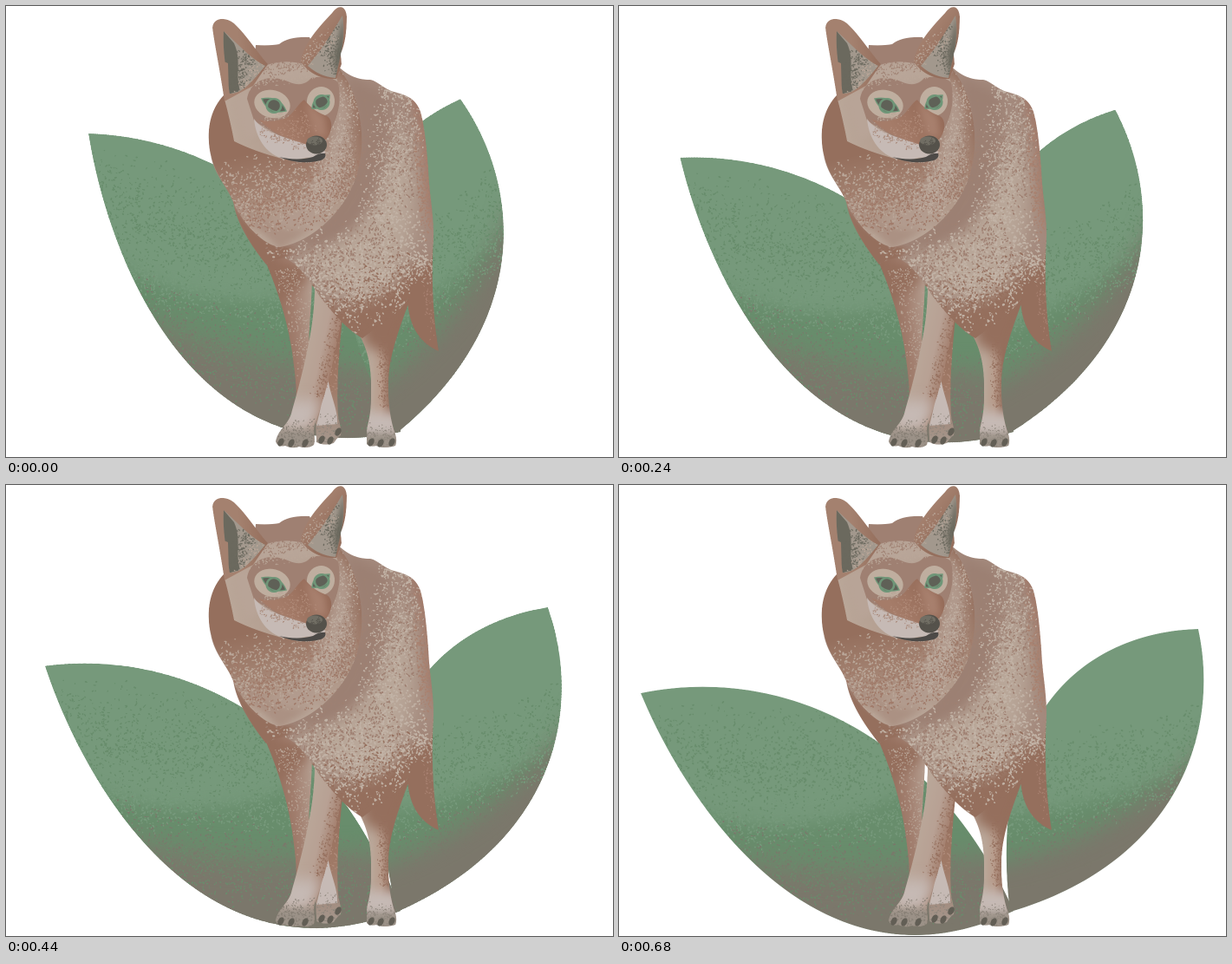
An HTML page with a canvas for the animation above (1.92 s loop, 700 by 520 pixels).

```html
<!DOCTYPE html>
<html lang="en">
<head>
<meta charset="utf-8">
<title>Coyote between leaves</title>
<style>
html, body { margin: 0; width: 100%; height: 100%; overflow: hidden; background: #fff; }
canvas { display: block; width: 700px; height: 520px; }
</style>
</head>
<body>
<canvas id="stage" width="700" height="520"></canvas>
<script>
const W = 700, H = 520, SCALE = 2;
const LOOP = 1920, STEP = 40, STEPS = 17;

const RUST = '#956f5d', BROWN = '#9f8072', TAN = '#baa799', PALE = '#c6bab5';
const GREY = '#6b695e', DARK = '#55524b', EYE = '#6f9678';
const LEAF = '#76997b', SHADE = '#688d6c', EARTH = '#7b776b';

let seed = 7;
function rnd() {
  seed = (seed * 1664525 + 1013904223) % 4294967296;
  return seed / 4294967296;
}

function layer(paint) {
  const c = document.createElement('canvas');
  c.width = W * SCALE;
  c.height = H * SCALE;
  const g = c.getContext('2d');
  g.scale(SCALE, SCALE);
  paint(g);
  return c;
}

function fill(g, d, color) {
  g.fillStyle = color;
  g.fill(new Path2D(d));
}

function line(g, d, color, width) {
  g.strokeStyle = color;
  g.lineWidth = width;
  g.lineCap = 'round';
  g.stroke(new Path2D(d));
}

function ramp(g, x0, y0, x1, y1, ...colors) {
  const r = g.createLinearGradient(x0, y0, x1, y1);
  colors.forEach((c, i) => r.addColorStop(i / (colors.length - 1), c));
  return r;
}

function within(g, d, paint) {
  g.save();
  g.clip(new Path2D(d));
  paint();
  g.restore();
}

function soft(g, d, color, blur) {
  g.save();
  g.filter = `blur(${blur * SCALE}px)`;
  fill(g, d, color);
  g.restore();
}

// Specks in a band that is densest halfway along its axis
function grain(g, color, x0, y0, x1, y1, width, count, size = 1) {
  const dx = x1 - x0, dy = y1 - y0, len = Math.hypot(dx, dy);
  g.fillStyle = color;
  for (let i = 0; i < count; i++) {
    const s = (rnd() + rnd()) / 2, u = (rnd() - 0.5) * width / len;
    g.beginPath();
    g.ellipse(x0 + dx * s - dy * u, y0 + dy * s + dx * u,
      size * (0.6 + rnd() * 1.2), size * (0.5 + rnd() * 0.5), rnd() * 3.14, 0, 6.283);
    g.fill();
  }
}

function ellipse(g, x, y, rx, ry, color, turn = 0) {
  g.fillStyle = color;
  g.beginPath();
  g.ellipse(x, y, rx, ry, turn, 0, 6.283);
  g.fill();
}

function paintLeft(g) {
  const d = 'M25 240C190 206 365 290 455 491C240 595 85 385 25 240Z';
  within(g, d, () => {
    fill(g, d, LEAF);
    soft(g, 'M40 355Q210 440 370 328L490 500L200 570Z', SHADE, 8);
    soft(g, 'M90 425Q250 462 370 435L500 420L500 570L100 570Z', EARTH, 15);
    grain(g, SHADE, 200, 250, 195, 400, 420, 2100);
    grain(g, LEAF, 200, 345, 205, 422, 320, 1300);
    grain(g, EARTH, 235, 390, 225, 505, 380, 1700, 0.8);
    grain(g, SHADE, 260, 425, 255, 505, 330, 900, 0.8);
  });
}

function paintRight(g) {
  const d = 'M668 166C570 168 420 230 451 492C639 437 695 290 668 166Z';
  within(g, d, () => {
    fill(g, d, LEAF);
    soft(g, 'M430 380Q570 372 700 305V530H430Z', SHADE, 8);
    soft(g, 'M420 440Q570 420 700 280V550H420Z', EARTH, 13);
    grain(g, SHADE, 550, 275, 575, 375, 270, 900);
    grain(g, LEAF, 563, 320, 580, 388, 270, 900);
    grain(g, EARTH, 565, 355, 595, 430, 260, 900, 0.7);
  });
}

function paintLegs(g) {
  const tail = 'M493 270C490 315 493 360 499 398C480 390 464 372 463 338C466 312 478 295 484 275Z';
  within(g, tail, () => {
    fill(g, tail, RUST);
    grain(g, TAN, 484, 255, 478, 325, 40, 260);
    grain(g, '#a98272', 490, 300, 494, 390, 20, 90, 0.8);
  });

  const far = 'M388 360C384 400 381 440 383 470C384 482 388 488 386 495Q381 499 378 504Q368 508 358 503L357 480C362 450 368 425 366 390Z';
  within(g, far, () => {
    fill(g, far, ramp(g, 0, 370, 0, 505, RUST, '#a07a67', '#a5988e'));
    fill(g, 'M371 428C374 450 383 465 382 482L358 484Z', PALE);
    grain(g, '#b49180', 385, 380, 372, 450, 60, 180, 0.7);
    grain(g, '#8d857b', 370, 468, 370, 512, 34, 120, 0.7);
  });

  const near = 'M298 292C314 328 325 366 330 400C334 430 337 452 332 464L354 435C345 400 352 360 353 318L335 285Z';
  within(g, near, () => {
    fill(g, near, ramp(g, 310, 345, 352, 340, RUST, '#a27f6f', '#b39b8d'));
    soft(g, 'M298 292L350 300L345 320L310 345Z', RUST, 6);
    grain(g, TAN, 322, 380, 362, 370, 150, 400, 0.7);
  });

  const hind = 'M405 375C416 393 421 412 421 440C421 458 421 470 416 488L416 505Q420 509 427 507Q436 511 449 507Q452 500 447 488C442 470 441 455 441 437C441 405 452 376 466 338L420 345Z';
  within(g, hind, () => {
    fill(g, hind, ramp(g, 422, 420, 443, 420, TAN, '#b89c8c', RUST));
    soft(g, 'M400 345H470L447 405L415 392Z', RUST, 7);
    soft(g, 'M410 468H455V515H410Z', PALE, 6);
    soft(g, 'M410 492H455V515H410Z', '#9b9187', 4);
    grain(g, RUST, 428, 425, 446, 425, 75, 220, 0.7);
    grain(g, '#8d857b', 432, 480, 432, 514, 40, 160, 0.7);
  });

  const front = 'M356 318C356 355 351 380 346 403C339 435 333 455 329 470C325 483 314 488 311 502Q313 509 322 507Q331 511 338 508Q348 511 355 506C358 497 352 489 358 477C365 457 374 428 379 400Q384 380 387 360Z';
  within(g, front, () => {
    fill(g, front, ramp(g, 342, 410, 378, 418, TAN, '#b8a194', '#a27c6a'));
    soft(g, 'M320 455H365L350 490H315Z', PALE, 8);
    soft(g, 'M305 488H360V515H305Z', '#9b9187', 4);
    grain(g, RUST, 365, 390, 387, 396, 120, 260, 0.7);
    grain(g, '#857d73', 334, 474, 334, 514, 52, 240, 0.7);
  });

  const claws = [[317, 503], [329, 504], [345, 504], [364, 500], [374, 501], [383, 491], [421, 503], [432, 504], [445, 503]];
  for (const [x, y] of claws) ellipse(g, x, y, 3.2, 5, '#625e55', 0.5);
}

function paintBody(g) {
  const d = 'M250 104C234 122 231 150 236 172C240 195 255 208 262 226C266 250 281 274 300 298Q310 291 322 291C340 299 350 318 362 335C380 358 395 374 411 383C425 372 445 362 462 340C470 320 480 310 490 292C497 262 490 230 488 205C486 170 483 140 478 122C472 106 462 103 448 99C436 96 428 86 420 85C405 85 395 80 386 72L300 60Z';
  within(g, d, () => {
    fill(g, d, '#a58b7e');
    soft(g, 'M455 130C480 190 478 260 445 330C410 352 365 330 335 285C390 270 425 235 432 190Z', '#b9a799', 11);
    soft(g, 'M390 78L440 100C447 160 432 215 412 242C395 268 360 288 312 280C370 260 400 200 405 150Z', '#9c8073', 7);
    soft(g, 'M466 95L500 110V270L488 230C484 180 482 140 466 110Z', '#a17767', 5);
    soft(g, 'M340 330C390 362 430 350 485 285L490 400H370Z', RUST, 7);
    soft(g, 'M245 205C275 250 295 276 335 279L318 296L295 310Z', RUST, 3);
    grain(g, '#c2b3a6', 415, 150, 485, 162, 190, 1000);
    grain(g, BROWN, 435, 95, 480, 240, 120, 750);
    grain(g, '#c2b3a6', 385, 245, 416, 380, 180, 1500, 1.2);
    grain(g, BROWN, 360, 250, 400, 340, 150, 650);
    grain(g, RUST, 395, 300, 422, 385, 150, 650);
    grain(g, '#a98270', 478, 120, 492, 280, 22, 350);
  });
}

function paintRuff(g) {
  const d = 'M250 104C232 124 231 152 237 174C242 196 255 208 262 226C275 255 300 277 316 278C350 272 380 245 396 215C412 185 414 150 405 115C400 95 392 82 384 72L290 60Z';
  within(g, d, () => {
    fill(g, d, ramp(g, 300, 165, 320, 260, RUST, '#a38372', TAN));
    soft(g, 'M380 76C402 100 410 160 388 212L340 262L300 248C355 235 375 165 374 95Z', '#b29b8e', 7);
    soft(g, 'M258 225L316 281L390 230L370 250Q320 272 278 228Z', '#ab9183', 4);
    grain(g, TAN, 308, 165, 326, 262, 180, 1250);
    grain(g, '#a07a69', 315, 180, 330, 264, 180, 900);
    grain(g, '#c0afa2', 362, 145, 408, 160, 180, 700, 0.8);
    grain(g, '#9d7c6c', 387, 145, 417, 152, 150, 400, 0.8);
  });
}

function paintEars(g) {
  const left = 'M252 110C246 70 240 42 238 25C239 13 253 12 263 20C278 34 290 54 302 67L285 92Z';
  within(g, left, () => {
    fill(g, left, ramp(g, 240, 60, 300, 55, '#a4816f', '#a4816f', RUST));
    const inner = 'M251 29C250 48 252 64 258 101C271 101 280 92 299 69C281 60 266 42 251 29Z';
    fill(g, inner, '#a2988d');
    fill(g, 'M251 29C250 48 252 64 258 101L270 98C264 78 272 63 263 43Z', GREY);
    within(g, inner, () => {
      grain(g, GREY, 258, 66, 287, 78, 65, 280, 0.8);
      grain(g, TAN, 272, 70, 300, 82, 60, 120, 0.8);
    });
    fill(g, 'M249 63L256 66L257 101L251 94Z', '#a4816f');
  });

  const right = 'M340 64C343 43 361 24 376 8C384 -3 392 0 393 12C393 30 391 44 386 55L387 67L381 84C363 85 348 77 340 64Z';
  within(g, right, () => {
    fill(g, right, ramp(g, 345, 30, 375, 55, '#a98674', RUST));
    const inner = 'M388 11C377 29 367 47 348 69C359 79 370 82 380 83L386 56C390 40 390 24 388 11Z';
    fill(g, inner, '#a2988d');
    within(g, inner, () => {
      soft(g, 'M390 8L391 58L381 82L378 58Z', GREY, 3);
      grain(g, GREY, 362, 60, 394, 50, 80, 340, 0.8);
    });
    grain(g, TAN, 350, 40, 366, 58, 55, 110, 0.7);
  });
}

function paintFace(g) {
  fill(g, 'M288 45Q304 46 315 44Q326 35 350 36L362 60L386 76L370 100H270L285 80Z', '#9f8072');

  const d = 'M252 108Q272 99 301 68Q321 61 343 67Q360 80 381 82C389 105 384 132 370 151L367 170L340 181L318 176Q287 168 263 156Q258 130 252 108Z';
  within(g, d, () => {
    fill(g, d, ramp(g, 255, 130, 300, 125, TAN, '#b5a092'));
    soft(g, 'M277 155L262 112L276 96Q294 115 292 148Z', '#b8a497', 3);
    soft(g, 'M300 67L343 64L366 82L326 92L282 86Z', '#b8a598', 4);
    fill(g, 'M278 107C281 87 302 77 325 87Q342 95 352 83Q372 79 383 88C388 110 382 135 369 150L344 165Q300 142 286 132Z', BROWN);
    grain(g, TAN, 315, 64, 320, 94, 80, 270, 0.7);
    grain(g, BROWN, 318, 60, 320, 82, 60, 150, 0.7);
  });

  ellipse(g, 307, 113, 21, 16, '#bfae9f', 0.25);
  ellipse(g, 363, 110, 16, 17, '#bfae9f', 0.25);
  grain(g, TAN, 305, 122, 315, 142, 35, 100, 0.7);

  const bridge = 'M344 108C337 112 331 125 323 129Q303 136 291 130Q304 145 326 153L349 163L369 154C379 142 376 128 368 126Q354 121 344 108Z';
  within(g, bridge, () => {
    fill(g, bridge, ramp(g, 320, 145, 360, 118, '#a57c69', '#956b58'));
    soft(g, 'M344 108L368 128L370 152L354 148Z', '#a8806e', 4);
    grain(g, '#b28d7b', 317, 134, 340, 160, 55, 180, 0.7);
  });

  const muzzle = 'M286 130C297 147 326 152 347 160L369 168Q365 174 345 175Q330 179 316 175C300 169 288 153 286 130Z';
  fill(g, muzzle, PALE);
  within(g, muzzle, () => grain(g, '#a98a7b', 325, 142, 319, 164, 60, 140, 0.7));
  fill(g, 'M315 174Q336 179 354 174Q361 169 368 170Q370 175 363 178Q338 184 315 174Z', '#4d4a47');

  ellipse(g, 358, 160, 12, 10.5, DARK);
  ellipse(g, 356, 155.5, 9, 5, '#716e64');
  grain(g, DARK, 356, 152, 357, 164, 17, 45, 0.6);
}

function paintEye(g, x, y, d) {
  fill(g, d, '#5f6157');
  ellipse(g, x, y, 9.5, 9, EYE);
  ellipse(g, x, y, 6.8, 6.8, '#5f6157');
  line(g, d, EYE, 1.4);
}

const leaves = [
  { art: layer(paintLeft), x: 455, y: 491, turn: 13.43 },
  { art: layer(paintRight), x: 451, y: 492, turn: -22.9 }
];
const coyote = layer(g => {
  paintLegs(g);
  paintBody(g);
  paintRuff(g);
  paintFace(g);
  paintEars(g);
  paintEye(g, 309, 115, 'M295 107Q316 103 323 121Q303 126 295 107Z');
  paintEye(g, 364, 111, 'M353 118Q354 103 373 103Q373 120 353 118Z');
});

const stage = document.getElementById('stage').getContext('2d');

function draw(time) {
  const t = Math.min(1, Math.floor((time % LOOP) / STEP) / STEPS);
  const eased = t - 0.043 * Math.sin(2 * Math.PI * t);
  stage.clearRect(0, 0, W, H);
  for (const { art, x, y, turn } of leaves) {
    stage.save();
    stage.translate(x, y);
    stage.rotate(turn * (1 - eased) * Math.PI / 180);
    stage.drawImage(art, -x, -y, W, H);
    stage.restore();
  }
  stage.drawImage(coyote, 0, 0, W, H);
}

const start = performance.now();
function tick() {
  draw(performance.now() - start);
  requestAnimationFrame(tick);
}
tick();
</script>
</body>
</html>
```
